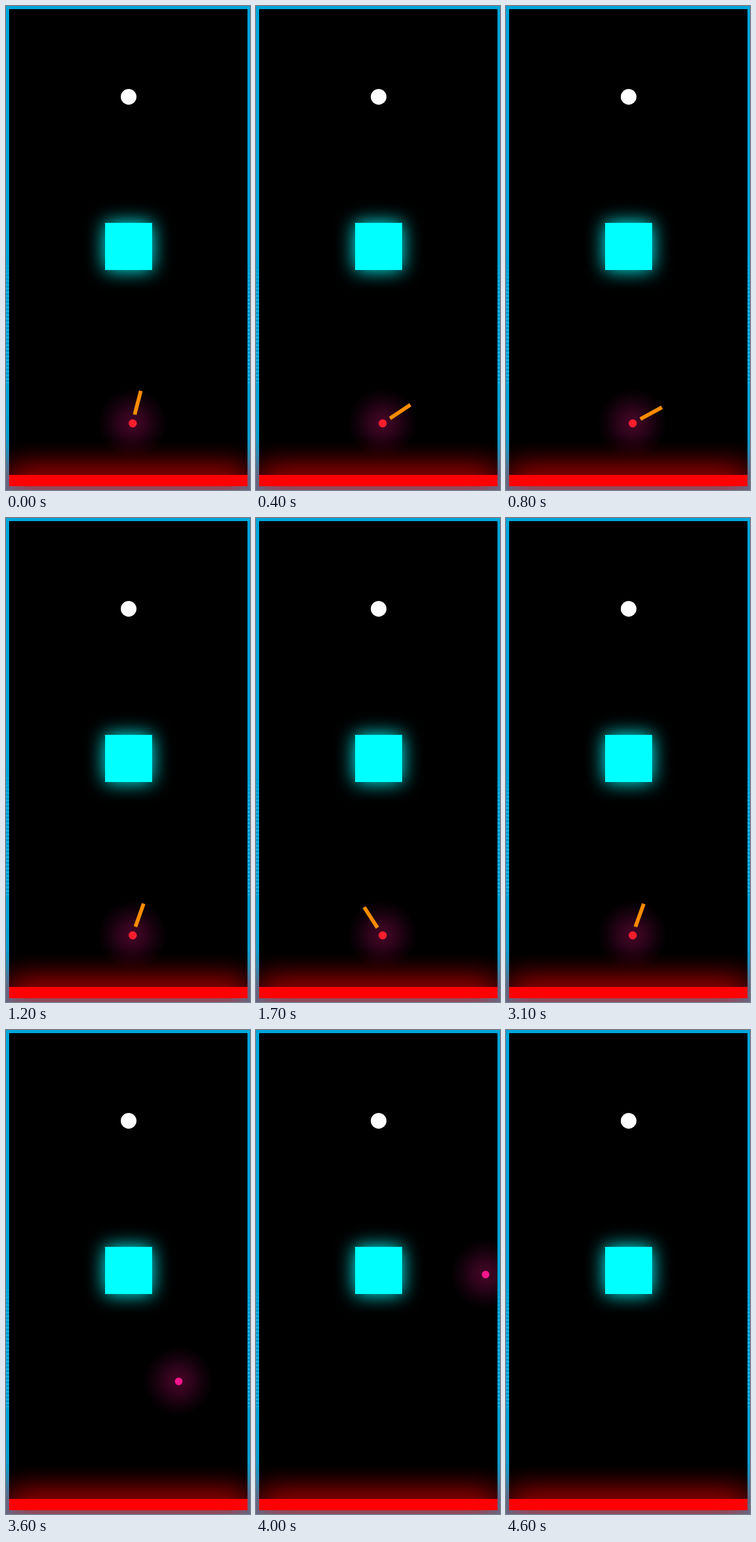
An HTML page that plays this animation: 389x770 px, repeating every 4700 ms.

```html
<!DOCTYPE html>
<html lang="en">
<head>
<meta charset="utf-8">
<title>Bounce shot</title>
<style>
  html, body { margin: 0; width: 100%; height: 100%; overflow: hidden; }
  body { position: relative; background: linear-gradient(#00a5da 0 75%, #0a9fd2 88%, #3f82a4); }
  div { position: absolute; }
  .lines {
    left: 0; top: 400px; width: 389px; height: 200px;
    background: repeating-linear-gradient(#1fb2e2 0 3px, #0099cf 3px 6px);
    -webkit-mask: linear-gradient(transparent, #000 30%);
    mask: linear-gradient(transparent, #000 30%);
  }
  .field { left: 5px; top: 5px; width: 380px; height: 759px; background: #000; overflow: hidden; }
  /* shift so that children use stage coordinates */
  .space { left: -5px; top: -5px; }
  .goal { left: 183px; top: 132px; width: 25px; height: 25px; border-radius: 50%; background: #fff; }
  .block { left: 158px; top: 345px; width: 75px; height: 75px; background: #0ff; box-shadow: 0 0 30px #0ff; }
  .lava {
    left: 5px; top: 746px; width: 380px; height: 18px; background: #f00;
    box-shadow: 0 0 50px #f00, 0 0 50px #f00;
  }
  .ball { left: 0; top: 0; }
  .glow {
    left: -56px; top: -56px; width: 112px; height: 112px;
    background: radial-gradient(closest-side, rgba(255, 20, 147, .27), rgba(255, 20, 147, .19) 35%,
      rgba(255, 20, 147, .07) 70%, transparent);
  }
  .dot { left: -6.5px; top: -6.5px; width: 13px; height: 13px; border-radius: 50%; }
  .aim { left: -3px; top: -53.5px; width: 6px; height: 39px; background: #ff8c00; transform-origin: 3px 53.5px; }
</style>
</head>
<body>
<div class="lines"></div>
<div class="field">
  <div class="space">
    <div class="block"></div>
    <div class="ball">
      <div class="glow"></div>
      <div class="aim"></div>
      <div class="dot"></div>
    </div>
    <div class="goal"></div>
  </div>
</div>
<div class="lava"></div>
<script>
  const LOOP = 4700, STEP = 100;
  const SWING = 3050, PEAK = 624, MAX_ANGLE = 80;
  const AIMED = 3245, LAUNCH = 3353, HIT = 4560;
  const START = { x: 201.5, y: 663.5 };
  const WALL = 379.5, RISE = 0.425, SLOPE = 0.698;

  const ball = document.querySelector('.ball');
  const aim = document.querySelector('.aim');
  const dot = document.querySelector('.dot');

  // Triangle wave between -MAX_ANGLE and MAX_ANGLE, in degrees from vertical
  function aimAngle(t) {
    const phase = (((t - PEAK) / SWING) % 1 + 1) % 1;
    return MAX_ANGLE * (4 * Math.abs(phase - 0.5) - 1);
  }

  // Straight flight, mirrored at the right wall
  function ballPos(t) {
    const rise = Math.max(0, t - LAUNCH) * RISE;
    const x = START.x + rise * SLOPE;
    return { x: WALL - Math.abs(WALL - x), y: START.y - rise };
  }

  function draw(t) {
    const { x, y } = ballPos(t);
    const flying = t >= LAUNCH;
    ball.style.transform = `translate(${x}px, ${y}px)`;
    ball.style.visibility = t < HIT ? 'visible' : 'hidden';
    aim.style.display = flying ? 'none' : 'block';
    aim.style.transform = `rotate(${aimAngle(Math.min(t, AIMED))}deg)`;
    dot.style.background = flying ? '#f5168c' : '#ff1e2d';
    dot.style.transform = flying ? 'scale(.94)' : 'none';
  }

  const begin = performance.now();
  function tick() {
    const t = (performance.now() - begin) % LOOP;
    draw(Math.floor(t / STEP) * STEP);
    requestAnimationFrame(tick);
  }
  draw(0);
  requestAnimationFrame(tick);
</script>
</body>
</html>
```
